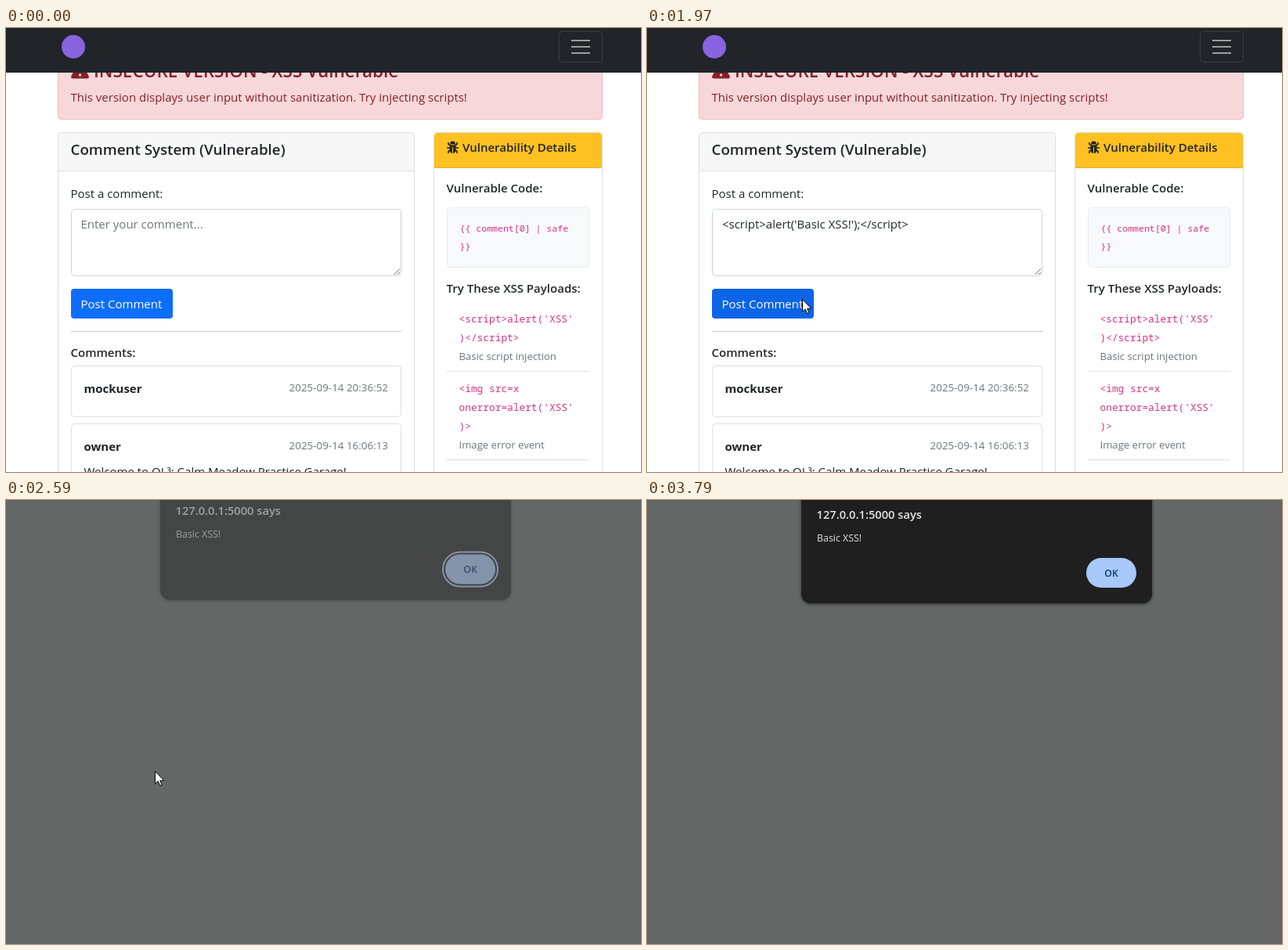
Animation, 811 px wide and 567 px high, one loop 3.82 s. Source, as an HTML page:

```html
<!DOCTYPE html>
<html lang="en">
<head>
<meta charset="utf-8">
<title>Comment demo</title>
<style>
html, body { margin: 0; height: 100%; overflow: hidden; background: #fff; }
svg { display: block; width: 811px; height: 567px; font: 15px "Open Sans", "Noto Sans", sans-serif; fill: #212529; }
text { white-space: pre; }
.semi { font-weight: 600; }
.bold { font-weight: 700; }
.small { font-size: 13.125px; fill: #6c757d; }
.date { font-size: 13.4px; fill: #6c757d; text-anchor: end; }
.code { font: 12.83px "Noto Sans Mono", "DejaVu Sans Mono", monospace; fill: #d63384; }
.box { fill: none; stroke: #dfdfdf; }
.danger { fill: #842029; }
.cursor { fill: #fff; stroke: #000; stroke-linejoin: round; }
</style>
</head>
<body>
<svg viewBox="0 0 811 567">
  <g id="page">
    <rect x="66.5" y="20.5" width="695" height="96" rx="4" fill="#f8d7da" stroke="#f1b8be"/>
    <path class="danger" d="M92 46Q94.500 42 97 46L105.500 61Q107 64.500 103 64.500H86Q82 64.500 83.500 61Z"/>
    <circle cx="94.500" cy="60" r="1.700" fill="#f8d7da"/>
    <text class="semi danger" x="112" y="63" font-size="22.500">INSECURE VERSION - XSS Vulnerable</text>
    <text class="danger" x="82.500" y="94">This version displays user input without sanitization. Try injecting scripts!</text>

    <rect width="811" height="57" fill="#212529"/>
    <circle cx="86" cy="24" r="15" fill="#8a63e0"/>
    <rect x="706.500" y="4.500" width="55" height="39" rx="4" fill="none" stroke="#3a3e42"/>
    <path d="M722 16H746M722 24H746M722 32H746" stroke="#9b9d9f" stroke-width="2"/>

    <path d="M67 182V138Q67 134 71 134H517Q521 134 521 138V182Z" fill="#f7f7f7"/>
    <path class="box" d="M67 182.500H521"/>
    <rect class="box" x="66.500" y="133.500" width="455" height="460" rx="4"/>
    <text class="semi" x="82.500" y="162" font-size="18.750">Comment System (Vulnerable)</text>
    <text x="82.500" y="217">Post a comment:</text>
    <rect x="83.500" y="231.500" width="421" height="85" rx="4" fill="#fff" stroke="#ced4da"/>
    <path d="M495.500 315L503 307.500M500 315L503 312" stroke="#666" fill="none"/>
    <text id="hint" x="95.500" y="256" fill="#6c757d">Enter your comment...</text>
    <text id="typed" x="96" y="256">&lt;script&gt;alert('Basic XSS!');&lt;/script&gt;</text>
    <rect id="ring" x="81" y="331" width="134" height="42" rx="6" fill="none" stroke="#98c1fe" stroke-width="4"/>
    <rect id="post" x="83" y="333" width="130" height="38" rx="4"/>
    <text x="95.500" y="358" fill="#fff">Post Comment</text>
    <path d="M83 387.500H505" stroke="#c7c8c9"/>
    <text class="semi" x="82.500" y="420">Comments:</text>
    <rect class="box" x="83.500" y="431.500" width="421" height="65" rx="4"/>
    <text class="bold" x="99.500" y="466">mockuser</text>
    <text class="date" x="488" y="464">2025-09-14 20:36:52</text>
    <rect class="box" x="83.500" y="505.500" width="421" height="90" rx="4"/>
    <text class="bold" x="99.500" y="540">owner</text>
    <text class="date" x="488" y="538">2025-09-14 16:06:13</text>
    <text x="99.500" y="572">Welcome to QL³: Calm Meadow Practice Garage!</text>

    <path d="M547 178V138Q547 134 551 134H757Q761 134 761 138V178Z" fill="#ffc021"/>
    <path d="M547 178.500H761" stroke="#dfb13a"/>
    <rect class="box" x="546.500" y="133.500" width="215" height="460" rx="4"/>
    <g fill="none" stroke="#212529" stroke-width="1.600">
      <path d="M563 153H578M565 146V148.500L568 150M576 146V148.500L573 150M565 160V157.500L568 155.500M576 160V157.500L573 155.500"/>
      <path d="M566.500 149.500H574.500V155Q574.500 160 570.500 160T566.500 155Z" fill="#212529" stroke="none"/>
      <path d="M567 148.500Q567 144.500 570.500 144.500T574 148.500Z" fill="#212529" stroke="none"/>
      <path d="M570.500 152V160" stroke="#ffc021" stroke-width="1"/>
    </g>
    <text class="semi" x="583" y="158">Vulnerability Details</text>
    <text class="semi" x="562.500" y="210">Vulnerable Code:</text>
    <rect x="563.500" y="229.500" width="181" height="76" rx="4" fill="#f8f9fa" stroke="#e9ecef"/>
    <g class="code" style="font-size:11.550px">
      <text x="579.500" y="260">{{ comment[0] | safe</text>
      <text x="579.500" y="283">}}</text>
    </g>
    <text class="semi" x="562.500" y="338">Try These XSS Payloads:</text>
    <rect id="row" x="563" y="350" width="182" height="88" fill="#f8f9fa"/>
    <g class="code">
      <text x="578.500" y="376">&lt;script&gt;alert('XSS'</text>
      <text x="578.500" y="400">)&lt;/script&gt;</text>
      <text x="578.500" y="465">&lt;img src=x</text>
      <text x="578.500" y="489">onerror=alert('XSS'</text>
      <text x="578.500" y="513">)&gt;</text>
    </g>
    <text class="small" x="578.500" y="424">Basic script injection</text>
    <text class="small" x="578.500" y="537">Image error event</text>
    <path class="box" d="M563 438.500H745M563 551.500H745"/>
  </g>

  <g id="blocked">
    <rect width="811" height="567" fill="#656766"/>
    <g id="dialog">
      <rect x="197" y="-40" width="448" height="172" rx="12" fill="#1f1f1f" style="filter:drop-shadow(0 1px 2px #0008)"/>
      <text class="semi" x="216.500" y="24" font-size="14.700" fill="#e3e3e3">127.0.0.1:5000 says</text>
      <text x="217" y="53" font-size="12.400" fill="#e3e3e3">Basic XSS!</text>
      <rect id="focus" x="558" y="71" width="70" height="44" rx="22" fill="none" stroke="#a8c7fa" stroke-width="2"/>
      <rect x="561" y="74" width="64" height="38" rx="19" fill="#a8c7fa"/>
      <text class="semi" x="593" y="98" font-size="12.200" text-anchor="middle" fill="#0b3a75">OK</text>
    </g>
  </g>

  <path id="arrow" class="cursor" d="M.500 .500V16.500L4.200 13L6.700 18.600L9 17.600L6.600 12.200H11.700Z"/>
  <path id="hand" class="cursor" d="M-1 13V2Q-1 .500 .500 .500T2 2V8Q2 6.800 3.500 7T5 8.500Q5.200 7.500 6.600 7.800T8 9.300Q8.500 8.600 9.700 9T11 10.700V16Q11 18.500 9 21V23.500H1V21.500Q-1 19.500-2.500 17L-5 13.500Q-6 12-4.700 11.200T-1 13.500M2 8V12M5 8.500V12M8 9.300V12.500"/>
</svg>
<script>
const LOOP = 3820;
const el = id => document.getElementById(id);
const show = (id, on) => el(id).style.display = on ? '' : 'none';
const ramp = (t, a, b) => Math.min(1, Math.max(0, (t - a) / (b - a)));
const mix = (a, b, k) => a + (b - a) * k;

const linear = k => k;
const easeIn = k => k ** 1.5;
const easeOut = k => 1 - (1 - k) ** 1.6;

// pointer stops: time, x, y, easing towards the stop
const stops = [
  [90, 670, 570], [530, 621, 381, easeOut], [640, 621, 381], [730, 622, 377],
  [1320, 622, 377], [1560, 421, 371, easeIn], [1820, 228, 345, easeOut],
  [2060, 190, 346, easeOut], [2710, 190, 346], [2760, 203, 366],
  [2830, 241, 393], [3280, 500, 570]
];

function pointer(t) {
  const i = stops.findIndex(s => s[0] > t);
  if (i < 1) return (i ? stops.at(-1) : stops[0]).slice(1, 3);
  const [t0, x0, y0] = stops[i - 1], [t1, x1, y1, ease = linear] = stops[i];
  const k = ease(ramp(t, t0, t1));
  return [mix(x0, x1, k), mix(y0, y1, k)];
}

const rgb = (a, b, k) => `rgb(${a.map((v, i) => Math.round(mix(v, b[i], k)))})`;
const blue = [13, 110, 253], hover = [11, 94, 215], active = [10, 88, 202];

function draw(t) {
  const [x, y] = pointer(t);
  const onHand = t < 1600 ? x > 563 : t > 2710;
  const visible = t >= 120 && t < 3280;
  for (const [id, on] of [['arrow', !onHand], ['hand', onHand]]) {
    show(id, on && visible);
    el(id).setAttribute('transform', `translate(${Math.round(x)} ${Math.round(y)})`);
  }

  show('row', t < 1850 && t > 200 && y < 438);
  show('hint', t < 1020);
  show('typed', t >= 1020);

  const press = ramp(t, 2200, 2350);
  el('post').style.fill = press ? rgb(hover, active, press) : rgb(blue, hover, ramp(t, 1880, 2030));
  el('ring').style.opacity = press;

  const open = ramp(t, 2490, 2710);
  show('page', t < 2500);
  show('blocked', t >= 2500);
  el('dialog').style.opacity = open;
  el('dialog').setAttribute('transform', `translate(0 ${-11.5 * (1 - open) ** 1.5})`);
  show('focus', t < 3790);
}

const start = performance.now();
function tick() {
  draw((performance.now() - start) % LOOP);
  requestAnimationFrame(tick);
}
tick();
</script>
</body>
</html>
```
